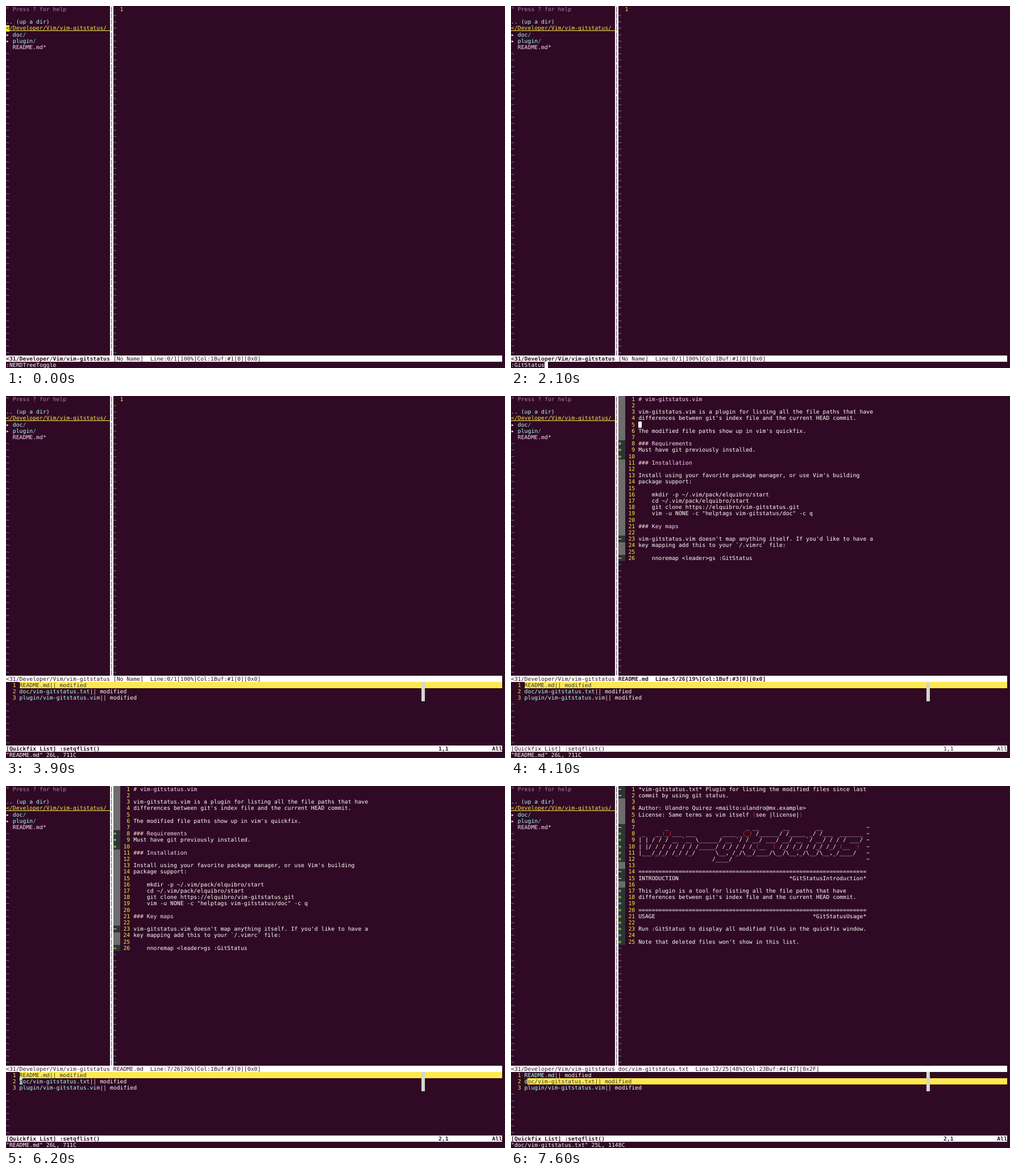
These frames come from a looping animation (878 by 638 pixels, 8000 ms). An HTML page with a canvas:

```html
<!DOCTYPE html>
<html lang="en">
<head>
<meta charset="utf-8">
<title>vim-gitstatus</title>
<style>
html, body { margin: 0; width: 100%; height: 100%; overflow: hidden; background: #300a24; }
canvas { display: block; }
</style>
</head>
<body>
<canvas id="term" width="878" height="638"></canvas>
<script>
const ctx = document.getElementById('term').getContext('2d');
const LOOP = 8000, CW = 5.899, RH = 11.2, COLS = 148;
const FONT = '9.75px "DejaVu Sans Mono", monospace';
const BG = '#300a24', WHITE = '#ffffff', YELLOW = '#fce94f', BLUE = '#729fcf',
      CYAN = '#34e2e2', PALE = '#afffff', MAUVE = '#ad7fa8', PINK = '#ffd7ff',
      ROSE = '#ffd7d7', RED = '#ef2929', GREEN = '#8ae234', DARK = '#2e3436',
      GREY = '#6c6c6c', SILVER = '#d3d7cf';
const SPLIT = 31, PANE = 32, TEXT = 38;

const README = [
  '# vim-gitstatus.vim',
  '',
  'vim-gitstatus.vim is a plugin for listing all the file paths that have',
  "differences between git's index file and the current HEAD commit.",
  '',
  "The modified file paths show up in vim's quickfix.",
  '',
  '### Requirements',
  'Must have git previously installed.',
  '',
  '### Installation',
  '',
  "Install using your favorite package manager, or use Vim's building",
  'package support:',
  '',
  '    mkdir -p ~/.vim/pack/elquibro/start',
  '    cd ~/.vim/pack/elquibro/start',
  '    git clone https://elquibro/vim-gitstatus.git',
  '    vim -u NONE -c "helptags vim-gitstatus/doc" -c q',
  '',
  '### Key maps',
  '',
  "vim-gitstatus.vim doesn't map anything itself. If you'd like to have a",
  'key mapping add this to your `/.vimrc` file:',
  '',
  '    nnoremap <leader>gs :GitStatus'
];
const README_SIGNS = '.......+++............~..~';

const header = s => s.padEnd(68) + '~';
const section = (name, tag) => name + tag.padStart(68 - name.length);
const RULE = '='.repeat(68);
const HELP = [
  '*vim-gitstatus.txt* Plugin for listing the modified files since last',
  'commit by using git status.',
  '',
  'Author: Ulandro Quirez <mailto:ulandro@mx.example>',
  'License: Same terms as vim itself (see |license|)',
  '',
  header('        _                       _ __       __        __'),
  header(' _   __(_)___ ___        ____ _(_) /______/ /_____ _/ /___  _______'),
  header('| | / / / __ `__ \\______/ __ `/ / __/ ___/ __/ __ `/ __/ / / / ___/'),
  header('| |/ / / / / / / /_____/ /_/ / / /_(__  ) /_/ /_/ / /_/ /_/ (__  )'),
  header('|___/_/_/ /_/ /_/      \\__, /_/\\__/____/\\__/\\__,_/\\__/\\__,_/____/'),
  header('                      /____/'),
  '',
  RULE,
  section('INTRODUCTION', '*GitStatusIntroduction*'),
  '',
  'This plugin is a tool for listing all the file paths that have',
  "differences between git's index file and the current HEAD commit.",
  '',
  RULE,
  section('USAGE', '*GitStatusUsage*'),
  '',
  'Run :GitStatus to display all modified files in the quickfix window.',
  '',
  "Note that deleted files won't show in this list."
];
const HELP_SIGNS = '~~....~+++++.~~.+++++++++';

const CHANGED = ['README.md', 'doc/vim-gitstatus.txt', 'plugin/vim-gitstatus.vim'];

function box(col, row, w, h, color) {
  const x = Math.round(col * CW), y = Math.round(row * RH);
  ctx.fillStyle = color;
  ctx.fillRect(x, y, Math.round((col + w) * CW) - x, Math.round((row + h) * RH) - y);
}

// One glyph per cell keeps the terminal grid exact.
function put(col, row, text, color, bold) {
  ctx.font = (bold ? 'bold ' : '') + FONT;
  ctx.fillStyle = color;
  [...text].forEach((ch, i) => {
    if (ch !== ' ') ctx.fillText(ch, (col + i) * CW, row * RH + 8.8);
  });
}

function cursor(col, row, ch, back = WHITE, ink = BG) {
  box(col, row, 1, 1, back);
  put(col, row, ch, ink);
}

function tildes(col, from, to) {
  for (let r = from; r < to; r++) put(col, r, '~', BLUE);
}

function drawTree(rows, focused) {
  put(0, 0, '" Press ? for help', MAUVE);
  put(0, 2, '.. (up a dir)', PALE);
  put(0, 3, '</Developer/Vim/vim-gitstatus/', YELLOW);
  ctx.fillRect(0, 43, Math.round(SPLIT * CW), 1);
  if (focused) cursor(0, 3, '<', YELLOW);
  ['doc', 'plugin'].forEach((dir, i) => {
    put(0, 4 + i, '▸', PINK);
    put(2, 4 + i, dir, PALE);
    put(2 + dir.length, 4 + i, '/', CYAN);
  });
  put(2, 6, 'README.md*', PINK);
  tildes(0, 7, rows);
  box(SPLIT, 0, 1, rows, WHITE);
  for (let r = 0; r < rows; r++) put(SPLIT, r, '|', BG);
}

function drawEmpty(rows) {
  put(PANE + 2, 0, '1', YELLOW);
  tildes(PANE, 1, rows);
}

function drawFile(lines, signs, rows) {
  box(PANE, 0, 2, lines.length, GREY);
  lines.forEach((line, r) => {
    const sign = signs[r];
    if (sign !== '.') {
      box(PANE, r, 2, 1, DARK);
      put(PANE, r, sign, sign === '+' ? GREEN : '#ffff87', true);
    }
    put(PANE + 2, r, String(r + 1).padStart(3), YELLOW);
    if (line[0] === '#') {
      const n = line.indexOf(' ');
      put(TEXT, r, line.slice(0, n), ROSE);
      put(TEXT + n, r, line.slice(n), PINK);
      return;
    }
    put(TEXT, r, line.replace(/[()]/g, ' '), WHITE);
    put(TEXT, r, line.replace(/[^()]/g, ' '), RED);
  });
  tildes(PANE, lines.length, rows);
}

function drawList(picked, at, focused, cursorOn) {
  CHANGED.forEach((name, i) => {
    const r = 45 + i, on = i === picked;
    put(2, r, String(i + 1), YELLOW);
    if (on) box(4, r, COLS - 4, 1, YELLOW);
    put(4, r, name, on ? DARK : PALE);
    put(4 + name.length, r, '||', on ? DARK : ROSE);
    put(7 + name.length, r, 'modified', on ? DARK : WHITE);
  });
  box(124, 45, 1, 3, SILVER);
  if (cursorOn) {
    const on = at === picked;
    cursor(4, 45 + at, CHANGED[at][0], on ? DARK : PALE, on ? YELLOW : BG);
  }
  tildes(0, 48, 55);
  box(0, 55, COLS, 1, WHITE);
  put(0, 55, '[Quickfix List] :setqflist()', BG, focused);
  put(129, 55, (at + 1) + ',1', BG, focused);
  put(145, 55, 'All', BG, focused);
}

function command(t) {
  if (t < 1000) return ':NERDTreeToggle';
  if (t < 3900) {
    const n = t < 1500 ? 0 : t < 1700 ? Math.floor((t - 1400) / 100) : t < 2000 ? 3 : t < 2100 ? 4 : 9;
    return ':' + 'GitStatus'.slice(0, n);
  }
  return t < 6500 ? '"README.md" 26L, 711C' : '"doc/vim-gitstatus.txt" 25L, 1148C';
}

function fileStatus(t) {
  if (t < 4100) return '[No Name]  Line:0/1[100%]Col:1Buf:#1[0][0x0]';
  if (t >= 6500) return 'doc/vim-gitstatus.txt  Line:12/25[48%]Col:23Buf:#4[47][0x2F]';
  const pos = t < 4600 ? '5/26[19%]' : t < 5100 ? '6/26[23%]' : '7/26[26%]';
  const code = t >= 4600 && t < 5100 ? '[84][0x54]' : '[0][0x0]';
  return 'README.md  Line:' + pos + 'Col:1Buf:#3' + code;
}

function focusAt(t) {
  if (t < 1000) return 'tree';
  if (t < 3000) return 'command';
  if (t < 4100) return 'list';
  if (t < 5800) return 'file';
  if (t < 6500) return 'list';
  return t < 7600 ? 'file' : 'list';
}

function draw(t) {
  const focus = focusAt(t), open = t >= 3000, rows = open ? 44 : 55;
  ctx.fillStyle = BG;
  ctx.fillRect(0, 0, 878, 638);
  drawTree(rows, focus === 'tree');

  if (t < 4100) drawEmpty(rows);
  else if (t < 6500) drawFile(README, README_SIGNS, rows);
  else drawFile(HELP, HELP_SIGNS, rows);

  if (focus === 'file') {
    if (t >= 6500) cursor(TEXT + 22, 11, '/');
    else {
      const r = t < 4600 ? 4 : t < 5100 ? 5 : 6;
      cursor(TEXT, r, README[r][0] || ' ');
    }
  }

  box(0, rows, COLS, 1, WHITE);
  put(0, rows, '<31/Developer/Vim/vim-gitstatus', BG, !open);
  put(PANE, rows, fileStatus(t), BG, focus === 'file');

  if (open) {
    const loading = t >= 3900 && t < 4100;
    drawList(t < 6500 ? 0 : 1, t < 6200 ? 0 : 1, focus === 'list', focus === 'list' && !loading);
  }

  const cmd = command(t);
  put(0, 56, cmd, WHITE);
  if (focus === 'command') cursor(cmd.length, 56, ' ');
}

function tick() {
  draw(performance.now() % LOOP);
  requestAnimationFrame(tick);
}

ctx.textBaseline = 'alphabetic';
ctx.textRendering = 'geometricPrecision';
tick();
</script>
</body>
</html>
```
